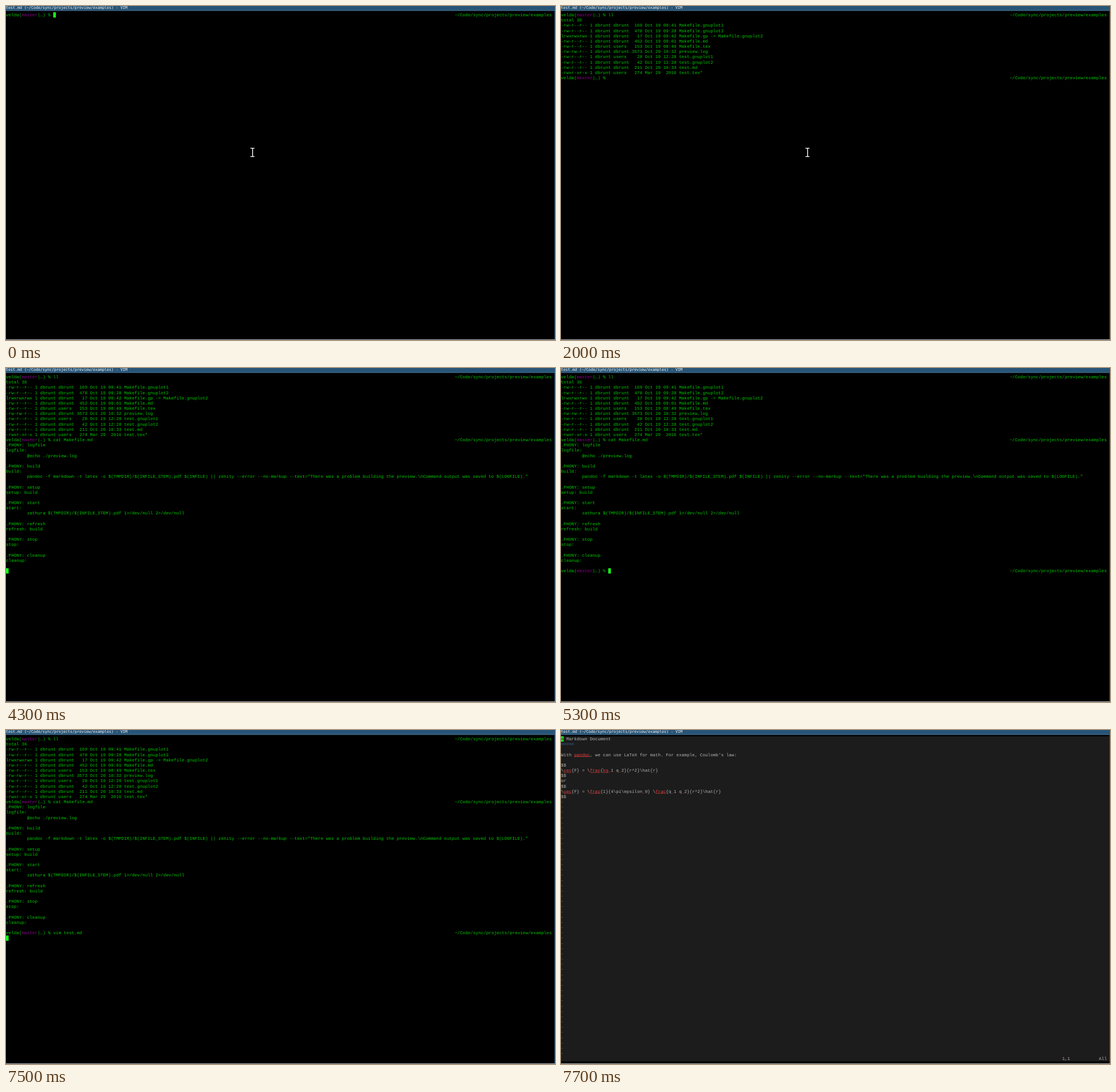
Recreate the animation shown at these times as an HTML page with a canvas. Size 959 px wide and 584 px high, loop 8000 ms.

```html
<!DOCTYPE html>
<html lang="en">
<head>
<meta charset="utf-8">
<title>Terminal session</title>
<style>
  html, body { margin: 0; width: 100%; height: 100%; overflow: hidden; background: #000; }
  canvas { display: block; }
</style>
</head>
<body>
<canvas id="stage" width="959" height="584"></canvas>
<script>
const ctx = document.getElementById('stage').getContext('2d');
const LOOP = 8000;
const SCALE = 11 / 24;            // terminal cells are 10 x 20 units
const CELL_W = 10, CELL_H = 20, TOP = 24, BASELINE = 15.3;
const MONO = '16.667px "Liberation Mono", "Courier New", monospace';
const TITLE_FONT = '16.61px "DejaVu Sans Mono", monospace';
const GREEN = '#00c800', CURSOR = '#1aff1a', PURPLE = '#8a008a';
const GRAY = '#b2b2b2', RED = '#e03c3c', BLUE = '#3f7fc0', VIM_BG = '#1c1c1c';

const HOST = 'velda', USER = 'dbrunt';
const CWD = '~/Code/sync/projects/preview/examples';
const PROMPT_COLS = HOST.length + 13;
const SCREEN_COLS = 208;

const listing = [
  ['-rw-r--r--', USER, 169, 'Oct 19 09:41', 'Makefile.gnuplot1'],
  ['-rw-r--r--', USER, 478, 'Oct 19 09:28', 'Makefile.gnuplot2'],
  ['lrwxrwxrwx', USER, 17, 'Oct 19 09:42', 'Makefile.gp -> Makefile.gnuplot2'],
  ['-rw-r--r--', USER, 452, 'Oct 19 09:01', 'Makefile.md'],
  ['-rw-r--r--', 'users', 153, 'Oct 19 08:49', 'Makefile.tex'],
  ['-rw-rw-r--', USER, 3573, 'Oct 20 10:32', 'preview.log'],
  ['-rw-r--r--', 'users', 28, 'Oct 19 12:28', 'test.gnuplot1'],
  ['-rw-r--r--', USER, 42, 'Oct 19 12:28', 'test.gnuplot2'],
  ['-rw-r--r--', USER, 211, 'Oct 20 10:33', 'test.md'],
  ['-rwxr-xr-x', 'users', 274, 'Mar 29  2016', 'test.tex*'],
].map(([mode, group, size, date, name]) =>
  `${mode} 1 ${USER} ${group.padEnd(6)} ${String(size).padStart(4)} ${date} ${name}`);
listing.unshift('total 36');

const makefile = String.raw`.PHONY: logfile
logfile:
        @echo ./preview.log

.PHONY: build
build:
        pandoc -f markdown -t latex -o $(TMPDIR)/$(INFILE_STEM).pdf $(INFILE) || zenity --error --no-markup --text="There was a problem building the preview.\nCommand output was saved to $(LOGFILE)."

.PHONY: setup
setup: build

.PHONY: start
start:
        zathura $(TMPDIR)/$(INFILE_STEM).pdf 1>/dev/null 2>/dev/null

.PHONY: refresh
refresh: build

.PHONY: stop
stop:

.PHONY: cleanup
cleanup:
`.split('\n');

// Words between « and » are flagged by the spell checker.
const markdown = String.raw`A Markdown Document
=====

With «pandoc», we can use LaTeX for math. For example, Coulomb's law:

$$
\«vec»{F} = \«frac»{«kq»_1 q_2}{r^2}\hat{r}
$$
or
$$
\«vec»{F} = \«frac»{1}{4\pi\epsilon_0} \«frac»{q_1 q_2}{r^2}\hat{r}
$$`.split('\n');

// Each command: prompt row, time of its prompt, typed states, time of its output.
const commands = [
  { row: 0, prompt: 0, typed: [[900, 'l'], [1100, 'll']], run: 1500, output: listing },
  { row: 12, prompt: 1800, run: 4300, output: makefile,
    typed: [[2100, 'c'], [2300, 'ca'], [2500, 'cat'], [2600, 'cat '], [2800, 'cat M'],
            [2900, 'cat Ma'], [3000, 'cat Makefile.'], [3800, 'cat Makefile.m'], [3900, 'cat Makefile.md ']] },
  { row: 37, prompt: 4500, run: 7500, output: [],
    typed: [[6000, 'v'], [6100, 'vi'], [6200, 'vim'], [6300, 'vim t'], [6500, 'vim te'],
            [6700, 'vim tes'], [6800, 'vim test.'], [7000, 'vim test.m'], [7100, 'vim test.md ']] },
];
const blinkOff = [[500, 900], [2000, 2100], [4800, 5300], [5800, 6000]];
const POINTER_HIDES = 2900, VIM_OPENS = 7600, VIM_READY = 7700;

function rect(x, y, w, h, color) {
  ctx.fillStyle = color;
  ctx.fillRect(x, y, w, h);
}

function inUnits(scale, draw) {
  ctx.save();
  ctx.scale(scale, scale);
  draw();
  ctx.restore();
}

function put(col, row, text, color) {
  ctx.fillStyle = color;
  ctx.fillText(text, col * CELL_W, TOP + row * CELL_H + BASELINE);
}

function cursor(col, row) {
  rect(col * CELL_W, TOP + row * CELL_H, CELL_W, CELL_H, CURSOR);
}

function prompt(row) {
  put(0, row, HOST + '(', GREEN);
  put(HOST.length + 1, row, 'master', PURPLE);
  put(HOST.length + 7, row, '|…) %', GREEN);
  put(SCREEN_COLS - CWD.length, row, CWD, GREEN);
}

function drawShell(t) {
  let col = 0, row = 0;
  for (const c of commands) {
    if (t < c.prompt) break;
    const input = c.typed.filter(([at]) => at <= t).pop()?.[1] ?? '';
    prompt(c.row);
    put(PROMPT_COLS, c.row, input, GREEN);
    [col, row] = [PROMPT_COLS + input.length, c.row];
    if (t >= c.run) {
      c.output.forEach((line, i) => put(0, c.row + 1 + i, line, GREEN));
      [col, row] = [0, c.row + 1 + c.output.length];
    }
  }
  if (!blinkOff.some(([from, to]) => t >= from && t < to)) cursor(col, row);
}

function markdownLine(line, row) {
  let col = 0;
  for (const part of line.split(/(«\w+?»|_)/)) {
    const flagged = part.startsWith('«');
    const text = flagged ? part.slice(1, -1) : part;
    const color = flagged || part === '_' ? RED : part === '=====' ? BLUE : GRAY;
    put(col, row, text, color);
    if (flagged) rect(col * CELL_W, TOP + row * CELL_H + 17, text.length * CELL_W, 1.6, RED);
    col += text.length;
  }
}

function drawVim(t) {
  const status = 61;
  if (t < VIM_READY) {
    rect(0, TOP + status * CELL_H, 2090, CELL_H, VIM_BG);
    put(0, status, '"test.md" 12L, 211C', GRAY);
    return;
  }
  rect(0, TOP, 2090, (status + 1) * CELL_H, VIM_BG);
  markdown.forEach(markdownLine);
  cursor(0, 0);
  put(0, 0, 'A', VIM_BG);
  for (let row = markdown.length; row < status; row++) put(0, row, '~', '#585858');
  put(191, status, '1,1', GRAY);
  put(205, status, 'All', GRAY);
}

function drawPointer() {
  rect(430, 249, 1.4, 14, '#fff');
  rect(427, 248, 7, 1.3, '#fff');
  rect(427, 262.7, 7, 1.3, '#fff');
}

function drawFrame() {
  rect(0, 0, 959, 8, '#285577');
  rect(0, 7.5, 959, 1, '#4c7899');
  rect(958, 8, 1, 575, '#285577');
  rect(0, 583, 959, 1, '#bcc2c4');
  inUnits(0.4, () => {
    ctx.font = TITLE_FONT;
    ctx.fillStyle = '#fff';
    ctx.fillText(`test.md (${CWD}) - VIM`, 0, 13.5);
  });
}

function render(t) {
  rect(0, 0, 959, 584, '#000');
  inUnits(SCALE, () => {
    ctx.font = MONO;
    (t < VIM_OPENS ? drawShell : drawVim)(t);
  });
  if (t < POINTER_HIDES) drawPointer();
  drawFrame();
}

const start = performance.now();
function tick() {
  render((performance.now() - start) % LOOP);
  requestAnimationFrame(tick);
}
ctx.textBaseline = 'alphabetic';
ctx.textRendering = 'geometricPrecision';
tick();
</script>
</body>
</html>
```
